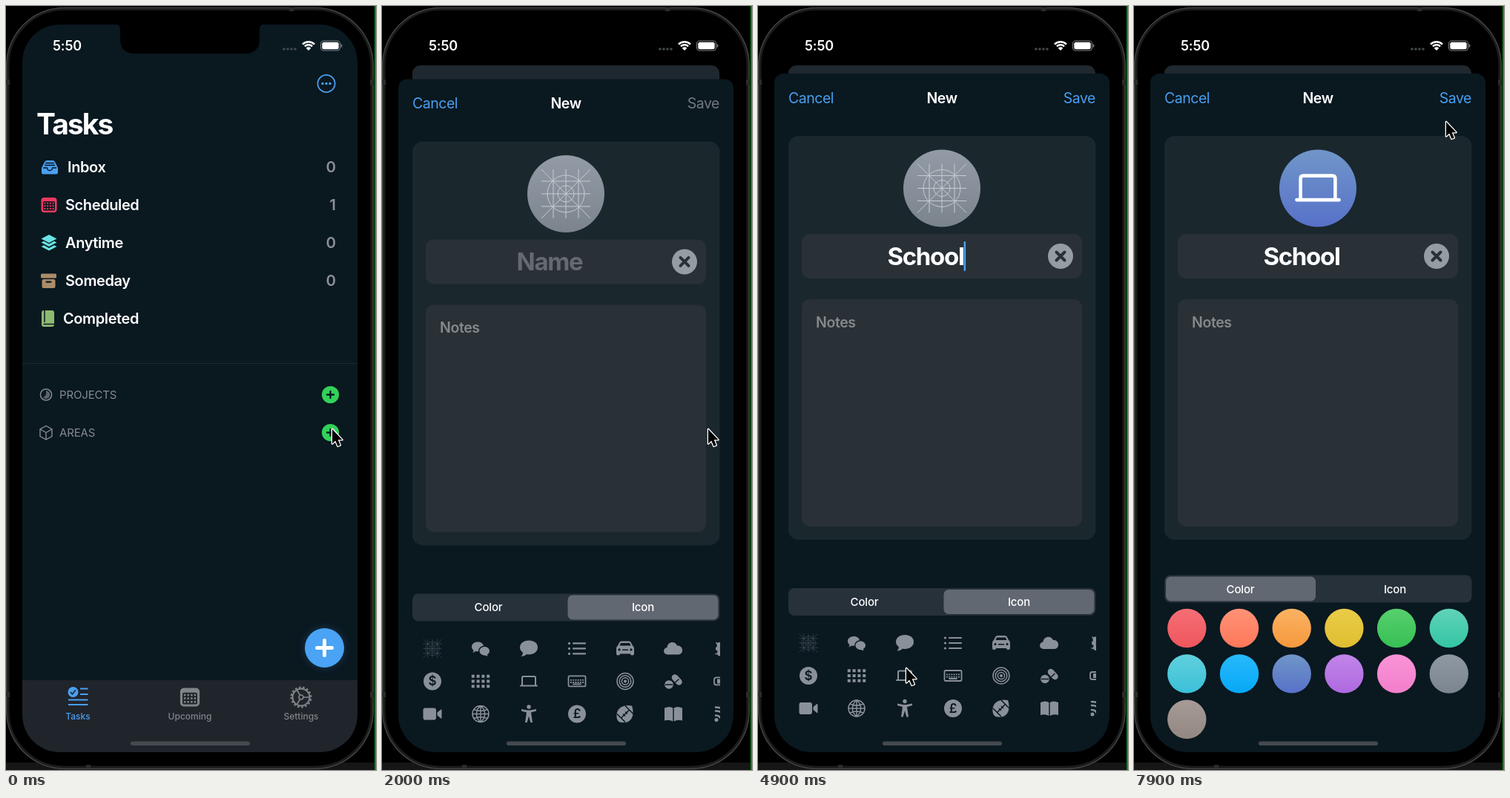
Recreate the animation shown at these times as an HTML page with a canvas. Size 499 by 1029 pixels, loop 8 s.

```html
<!DOCTYPE html>
<html lang="en">
<head>
<meta charset="utf-8">
<title>Tasks</title>
<style>
html, body { margin: 0; width: 100%; height: 100%; overflow: hidden; background: #000; }
canvas { display: block; }
</style>
</head>
<body>
<canvas width="499" height="1029"></canvas>
<script>
const ctx = document.querySelector('canvas').getContext('2d');
const LOOP = 8000;
const INK = '#0a1820', BLUE = '#4a9ff0', GREY = '#8a9097', FIELD = '#293036';

// ---------- helpers ----------
const clamp = v => Math.max(0, Math.min(1, v));
const mix = (a, b, p) => a + (b - a) * p;
const smooth = v => { v = clamp(v); return v * v * (3 - 2 * v); };
const disc = (x, y, r) => `M${x - r} ${y}a${r} ${r} 0 1 0 ${2 * r} 0a${r} ${r} 0 1 0 ${-2 * r} 0z`;
const dots = (cols, rows, gap, size) => {
  let d = '';
  for (let i = 0; i < cols * rows; i++) {
    const x = (i % cols - (cols - 1) / 2) * gap - size / 2;
    const y = (Math.floor(i / cols) - (rows - 1) / 2) * gap - size / 2;
    d += `M${x} ${y}h${size}v${size}h${-size}z`;
  }
  return d;
};

function fill(d, color) { ctx.fillStyle = color; ctx.fill(new Path2D(d)); }
function line(d, color, width, cap = 'butt') {
  ctx.strokeStyle = color;
  ctx.lineWidth = width;
  ctx.lineCap = cap;
  ctx.stroke(new Path2D(d));
}
function box(x, y, w, h, r, color, stroke) {
  ctx.beginPath();
  ctx.roundRect(x, y, w, h, r);
  if (stroke) { ctx.strokeStyle = color; ctx.lineWidth = stroke; ctx.stroke(); }
  else { ctx.fillStyle = color; ctx.fill(); }
}
function at(x, y, draw, scale = 1) {
  ctx.save();
  ctx.translate(x, y);
  ctx.scale(scale, scale);
  draw();
  ctx.restore();
}
function text(str, x, y, size, weight, color, align = 'left', spacing = -0.02) {
  ctx.font = `${weight} ${size}px Inter, sans-serif`;
  ctx.letterSpacing = spacing * size + 'px';
  ctx.textAlign = align;
  ctx.fillStyle = color;
  ctx.fillText(str, x, y);
  return ctx.measureText(str).width;
}
function ball(x, y, r, [top, bottom]) {
  const g = ctx.createLinearGradient(0, y - r, 0, y + r);
  g.addColorStop(0, top);
  g.addColorStop(1, bottom);
  fill(disc(x, y, r), g);
}

// ---------- icons: f fill, s stroke, w stroke width, c cut-out, k cut-out stroke, t cut-out text ----------
const GUIDES = 'M-33 0H33M0-33V33M-17-33V33M17-33V33M-33-17H33M-33 17H33M-33-33L33 33M33-33L-33 33'
  + disc(0, 0, 25) + disc(0, 0, 11);
const LAPTOP = 'M-9 5V-5q0-1.5 1.5-1.5h15q1.5 0 1.5 1.5V5M-11 6H11';

const ICONS = [
  { s: GUIDES, w: 1.6, scale: 0.37, color: '#49545c' },
  { f: 'M-4-9c-5 0-8 3-8 6.500c0 2 1 3.500 2.500 4.700l-1 3.300 4-2c6 1 10.500-2 10.500-6S1-9-4-9z',
    f2: 'M5.500-2.500c-4 0-7 2.500-7 5.700s3 5.800 7 5.800l4 1.300-.5-2.500c2-1.200 3-2.800 3-4.600 0-3.200-3-5.700-6.500-5.700z' },
  { f: 'M0-11c-7 0-12 4-12 9.500 0 3 1.500 5 4 6.700q0 3-2.500 5.200c3.500 0 5.500-1 7.500-2.600 9 1 15-3.300 15-9.300S7-11 0-11z' },
  { f: disc(-10.5, -7, 1.6) + disc(-10.5, 0, 1.6) + disc(-10.5, 7, 1.6), s: 'M-5-7H11M-5 0H11M-5 7H11', w: 2.2 },
  { f: 'M-12 0q0-3 2-4l2-4q1-2 3-2h10q2 0 3 2l2 4q2 1 2 4v7q0 2-2 2h-1q-2 0-2-2h-14q0 2-2 2h-1q-2 0-2-2z',
    c: 'M-7.500-4l1.500-3.500h12l1.500 3.500z' + disc(-8, 1.500, 1.6) + disc(8, 1.500, 1.6) + 'M-4 1h8v1.500h-8z' },
  { f: 'M-7 8c-8 0-7-9-1.500-9.500C-8-9 2-11 5-4c8-1 10 11 2 12z' },
  { f: disc(-3, -5, 3.5) + disc(-5, 0, 3) + disc(-2, 6, 4), s: 'M-7-8l3 4M-8 7h4', w: 1.5 },
  { f: disc(0, 0, 12), t: '$' },
  { f: dots(4, 3, 6.8, 4) },
  { s: LAPTOP, w: 2 },
  { s: 'M-10-7H10q1.500 0 1.500 1.500V5.500q0 1.500-1.500 1.500H-10q-1.500 0-1.500-1.500V-5.500q0-1.500 1.500-1.500zM-5 4H5', w: 1.8, f: dots(6, 2, 3.2, 1.9) },
  { f: disc(0, 0, 2), s: disc(0, 0, 4.6) + disc(0, 0, 7.8) + disc(0, 0, 11), w: 1.5 },
  { f: disc(-6, 4.5, 5.8), s: 'M2-5L7.500 1', w: 8.5, k: 'M-11 4.500H-1M2.500 1.500l5-4.500' },
  { s: 'M0-5h-7q-3 0-3 3v4q0 3 3 3h7', w: 1.8, f: 'M-6-3h8v6h-8z' },
  { f: 'M-10-8H2q3 0 3 3V5q0 3-3 3H-10q-2.500 0-2.500-3V-5q0-3 2.500-3zM6.500-2l5-4q1-.5 1 .7V5.500q0 1-1 .5l-5-4z' },
  { s: disc(0, 0, 11) + 'M0-11V11M-11 0H11M0-11c-7.500 6-7.500 16 0 22M0-11c7.500 6 7.500 16 0 22M-9-6q9 4 18 0M-9 6q9-4 18 0', w: 1.5 },
  { f: disc(0, -9.5, 2.7) + 'M-10-6.500l8 1.500h4l8-1.500v2.500l-7 2 2 13.500h-2.700L0 3l-2.300 8.500H-5L-3-2l-7-2z' },
  { f: disc(0, 0, 12), t: '£' },
  { f: 'M-11-2C-9-9-1-13 9-11c3 9 2 18-6 22-5 1-10 1-12-1-3-3-3-8-2-12z', k: 'M-5 5L5-5M-3 0l3 3M0-3l3 3M-11 0L0 11M0-11L11 0' },
  { f: 'M-12-8q7-3 11.300 0V10q-5-3-11.300-1zM12-8q-7-3-11.300 0V10q5-3 11.300-1z' },
  { f: disc(-7, 8, 2.5), s: 'M-8 2q7 0 8 8M-8-4q12 0 14 14M-8-9q8 0 12 5', w: 2.5 },
];

function icon(i, x, y) {
  const { f, f2, s, w, c, k, t, scale, color = GREY } = ICONS[i];
  at(x, y, () => {
    if (f) fill(f, color);
    if (f2) { line(f2, INK, 3); fill(f2, color); }
    if (s) line(s, color, w, 'round');
    if (c) fill(c, INK);
    if (k) line(k, INK, 1.5);
    if (t) text(t, 0, 6, 17, 600, INK, 'center', 0);
  }, scale);
}

const SWATCHES = [
  ['#f66f75', '#ee565d'], ['#ff9277', '#fe7859'], ['#fab263', '#f5993c'], ['#e9cc48', '#e0be30'],
  ['#58cf6d', '#36c055'], ['#60d3b8', '#33c5a4'], ['#60d0dd', '#3bc0d8'], ['#28b9fb', '#06a8f7'],
  ['#7096c8', '#5771c9'], ['#c285e9', '#ad6adf'], ['#f994d7', '#f27ecb'], ['#8f99a3', '#7a858e'],
  ['#a79b97', '#938781'],
];
const SLATE = ['#939ba6', '#7b848d'], INDIGO = SWATCHES[8];

// ---------- task list screen ----------
function calendar(color, bg) {
  box(-10.5, -10, 21, 20, 4, color);
  box(-8, -5, 16, 12.5, 1.5, bg);
  at(0, 1.2, () => fill(dots(4, 3, 3.7, 2), color));
}
function plus(x, y, r, arm, width, color, ink) {
  fill(disc(x, y, r), color);
  line(`M${x - arm} ${y}H${x + arm}M${x} ${y - arm}V${y + arm}`, ink, width, 'round');
}
function taskList(dimmed) {
  const accent = dimmed ? '#868c92' : BLUE;
  ctx.fillStyle = INK;
  ctx.fillRect(22, 25, 452, 980);
  line(disc(432, 104.5, 11.6), accent, 1.8);
  [427, 432, 437].forEach(x => fill(disc(x, 104.5, 1.7), accent));
  text('Tasks', 41, 173, 39, 700, '#fff', 'left', -0.05);

  const rows = [['Inbox', 83, '0'], ['Scheduled', 80, '1'], ['Anytime', 80, '0'], ['Someday', 80, '0'], ['Completed', 77, '']];
  rows.forEach(([name, x, count], i) => {
    const y = 224 + i * 51.1;
    text(name, x, y, 20, 600, '#fff');
    text(count, 445, y, 20.5, 600, '#8b9095', 'right', 0);
  });
  at(59, 217, () => {
    fill('M-11 1l4-8q1-2 3-2h8q2 0 3 2l4 8v6q0 2.500-2.500 2.500h-17q-2.500 0-2.500-2.500z', BLUE);
    line('M-9 1h5.500q0 3.500 3.500 3.500t3.500-3.500h5.500M-6-5.500H6M-7-2.500H7', INK, 1.3);
  });
  at(58, 268, () => calendar('#f0395f', INK));
  at(58, 319, () => {
    fill('M0-11L10.500-5.500 0 0-10.500-5.500z', '#69e4e4');
    fill('M-10.500-.5L-7-2.300 0 1.500 7-2.300 10.500-.5 0 5z', '#69e4e4');
    fill('M-10.500 5L-7 3.200 0 7 7 3.200 10.500 5 0 10.500z', '#69e4e4');
  });
  at(57.5, 370, () => {
    box(-10.5, -9.5, 21, 6, 1.5, '#ac8c69');
    box(-9, -2, 18, 12, 2.5, '#ac8c69');
    box(-4, 0.5, 8, 2.3, 1, INK);
  });
  at(56.5, 421, () => {
    box(-8.5, -11, 17, 22, 3, '#8fb972');
    line('M-4.500-11V5M-6 7.500H8.500', INK, 1.5);
  });

  ctx.fillStyle = '#1c2930';
  ctx.fillRect(22, 481, 452, 1);
  line(disc(54, 523.5, 7.6), '#858a8f', 1.5);
  fill('M54 518a5.500 5.500 0 1 1-4 9.500l4-4z', '#5b6268');
  line('M54 565.500l8 4.500v9.500l-8 4.500-8-4.500v-9.500zM46 570l8 4.500 8-4.500M54 574.500v9.500', '#858a8f', 1.4);
  text('PROJECTS', 72, 529, 15, 400, '#858a8f', 'left', -0.01);
  text('AREAS', 72, 580, 15, 400, '#858a8f', 'left', -0.01);
  plus(437.5, 523.5, 11.6, 4.6, 2.3, '#32d159', INK);
  plus(437.5, 574.5, 11.6, 4.6, 2.3, '#32d159', INK);

  ctx.save();
  ctx.shadowColor = '#4aa3f340';
  ctx.shadowBlur = 12;
  fill(disc(429.5, 864.5, 26.3), '#4aa3f4');
  ctx.restore();
  plus(429.5, 864.5, 26.3, 10, 5, '#4aa3f4', '#fff');
  tabBar();
}
function tabBar() {
  const dim = '#80858a';
  ctx.fillStyle = '#20242b';
  ctx.fillRect(22, 908, 452, 97);
  fill(disc(90.5, 924, 7), BLUE);
  line('M87 924l2.500 2.800 4.500-5.500', '#20242b', 1.7);
  line('M100 919.500h10.500M100 927h10.500M84 934.500h26.500M84 941h26.500', BLUE, 2.2);
  at(248, 931, () => calendar(dim, '#20242b'), 1.25);
  at(398, 931, () => {
    line(disc(0, 0, 11.5), dim, 2);
    ctx.setLineDash([2.6, 2.67]);
    line(disc(0, 0, 13.4), dim, 2.2);
    ctx.setLineDash([]);
    line(disc(0, 0, 3) + 'M3 0H11M-1.500-2.600L-5.500-9.500M-1.500 2.600L-5.500 9.500', dim, 1.7);
  });
  text('Tasks', 97, 961, 12, 500, BLUE, 'center', 0);
  text('Upcoming', 248, 961, 12, 500, dim, 'center', 0);
  text('Settings', 398, 961, 12, 500, dim, 'center', 0);
}

// ---------- sheet ----------
const TYPING = [3400, 3600, 3800, 4200, 4300, 4500];

function nameField(t) {
  const typed = 'School'.slice(0, TYPING.filter(time => t >= time).length);
  const label = s => text(s, 226, 349, 33, 700, typed ? '#fff' : '#646a70', 'center', -0.04);
  const width = label(typed || 'Name');
  if (t >= 2900 && t < 5400) box(typed ? 226 + width / 2 : 225, 317, 2.6, 40, 1, BLUE);
  fill(disc(408, 337, 17), '#949ca4');
  line('M402.500 331.500l11 11m0-11l-11 11', FIELD, 4, 'round');
}
function picker(t) {
  const p = smooth((t - 6130) / 350);
  const top = mix(784, 766.5, p);
  box(41, top, 414.5, 37, 8, '#27313a');
  box(mix(250.5, 43, p), top + 2, mix(203, 202, p), 33, 6.5, '#626872');
  text('Color', 143.5, top + 24, 15, 500, '#fff', 'center', -0.01);
  text('Icon', 352, top + 24, 15, 500, '#fff', 'center', -0.01);

  ctx.save();
  ctx.beginPath();
  ctx.rect(41, top + 40, 415, 300);
  ctx.clip();
  ctx.globalAlpha = 1 - p;
  if (p < 1) ICONS.forEach((_, i) => icon(i, 68 + i % 7 * 65, 858 + Math.floor(i / 7) * 44));
  ctx.globalAlpha = p;
  if (p > 0) SWATCHES.forEach((s, i) => ball(71.3 + i % 6 * 70.7, 838 + Math.floor(i / 6) * 61.4, 26.2, s));
  ctx.restore();
}
function sheet(t) {
  box(22, 91, 452, 1000, 12, INK);
  text('Cancel', 41, 131, 19.5, 400, BLUE, 'left', -0.025);
  text('New', 248, 131, 19.5, 600, '#fff', 'center');
  text('Save', 455, 131, 19.5, 400, t < 3400 ? '#717980' : BLUE, 'right', -0.025);
  box(41, 175, 414.5, 544, 14, '#1a272d');
  box(59, 307, 378, 60, 11, FIELD);
  box(59, 395, 378, 306, 11, FIELD);
  ball(248, 245.5, 52, t < 7200 ? SLATE : INDIGO);
  if (t < 5400) at(248, 245.5, () => line(GUIDES, '#c6ccd2', 1));
  else at(248, 245.5, () => line(LAPTOP, '#fff', 1.75, 'round'), 2.6);
  nameField(t);
  text('Notes', 78, 433, 19.5, 600, '#84898d', 'left', -0.02);
  picker(t);
}

// ---------- phone ----------
function body() {
  ctx.fillStyle = '#000';
  ctx.fillRect(0, 0, 499, 1029);
  ctx.fillStyle = '#161616';
  ctx.fillRect(0, 1019, 499, 10);
  box(0, 2, 496, 1026, 78, '#000');
  box(2.5, 4, 491, 1021.5, 76, '#1c1c1c', 4);
  box(0.7, 2.3, 494.6, 1025, 78, '#484848', 1.3);
  ctx.fillStyle = '#2c2c2c';
  [[0, 99, 5, 7], [491, 99, 5, 7], [0, 924, 5, 7], [491, 924, 5, 7], [382, 2, 6, 5], [108, 1022, 6, 5]]
    .forEach(r => ctx.fillRect(...r));
  ctx.fillStyle = '#0a8c14';
  ctx.fillRect(497, 0, 2, 1029);
}
function statusBar() {
  fill('M148 24q6 1 6 8v12q0 20 20 20h148q20 0 20-20v-12q0-7 6-8z', '#000');
  text('5:50', 63, 60, 18, 600, '#fff', 'left', -0.01);
  for (let i = 0; i < 4; i++) fill(disc(375 + i * 5, 58, 1.8), '#44494d');
  [11.3, 7.2].forEach(r => {
    ctx.beginPath();
    ctx.arc(408, 59.5, r, -Math.PI * 0.75, -Math.PI * 0.25);
    ctx.strokeStyle = '#fff';
    ctx.lineWidth = 2.5;
    ctx.stroke();
  });
  fill('M408 60l-3.300-3.300a4.700 4.700 0 0 1 6.600 0z', '#fff');
  box(424.5, 47, 26, 13, 4, '#7c8286', 1.1);
  box(426.3, 48.8, 22.4, 9.4, 2.5, '#fff');
  box(451.7, 51.3, 1.6, 4.5, 1, '#7c8286');
}

// ---------- pointer ----------
const MOVES = [ // start, end, x, y
  [2150, 2550, 274, 341], [4500, 4880, 200, 892], [5450, 5950, 171, 808],
  [6350, 6950, 222.5, 901], [7250, 7900, 421, 156],
];
const PRESSES = [[1300, 1450], [2800, 3000], [5200, 5400], [6000, 6200], [7050, 7200]];

function pointer(t) {
  let x = 440, y = 570;
  for (const [start, end, toX, toY] of MOVES) {
    const p = smooth((t - start) / (end - start));
    x = mix(x, toX, p);
    y = mix(y, toY, p);
  }
  if (PRESSES.some(([down, up]) => t >= down && t < up)) {
    fill(disc(x, y + 1.5, 23.5), 'rgba(200,202,202,.76)');
    line(disc(x, y + 1.5, 23), 'rgba(150,152,152,.6)', 1);
  }
  if (t >= 3400 && t < 4500) return;
  at(x, y, () => {
    const arrow = 'M0 0V19.500l4.300-4 3.200 7.400 3.300-1.400-3.100-7.200H13.500z';
    ctx.lineJoin = 'round';
    line(arrow, '#fff', 2.6);
    fill(arrow, '#000');
    ctx.lineJoin = 'miter';
  });
}

function render(t) {
  body();
  ctx.save();
  ctx.beginPath();
  ctx.roundRect(22, 25, 452, 980, 50);
  ctx.clip();

  // The list shrinks back while the sheet springs up over it.
  const back = smooth((t - 1450) / 560);
  const scale = mix(1, 0.916, back);
  ctx.save();
  ctx.translate(248, mix(25, 80, back));
  ctx.scale(scale, scale);
  ctx.translate(-248, -25);
  ctx.beginPath();
  ctx.roundRect(22, 25, 452, 980, mix(50, 12, back));
  ctx.clip();
  taskList(back > 0);
  ctx.fillStyle = `rgba(33,42,48,${0.92 * back})`;
  ctx.fillRect(22, 25, 452, 980);
  ctx.restore();

  if (t > 1450) {
    const w = 0.01253 * (t - 1450);
    const left = t < 2150 ? (1 + w) * Math.exp(-w) : 0;
    at(0, 938 * left, () => sheet(t));
  }
  box(168, 990.5, 161, 5.5, 3, '#454a4f');
  ctx.restore();
  statusBar();
  pointer(t);
}

function tick() {
  render(performance.now() % LOOP);
  requestAnimationFrame(tick);
}
tick();
</script>
</body>
</html>
```
